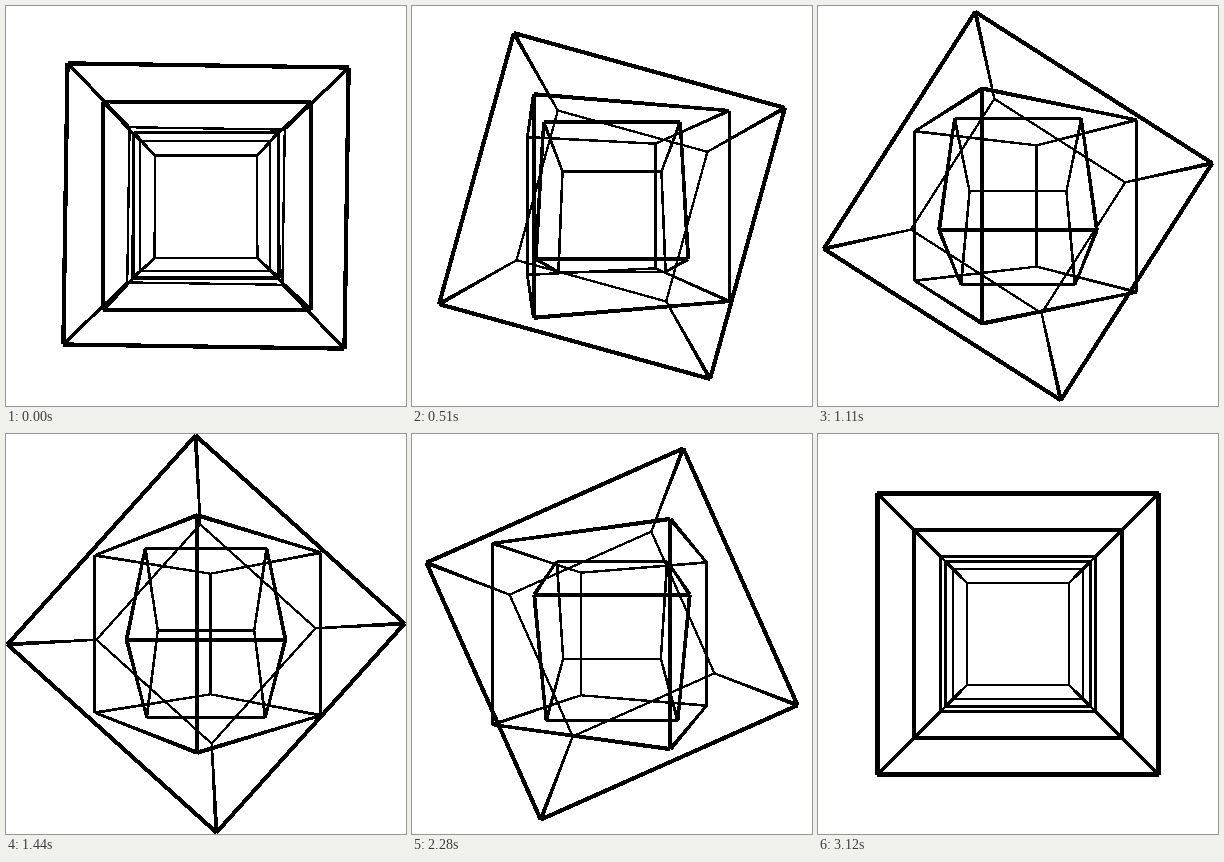
An HTML page for the animation above (3150 ms loop, 400 by 400 pixels).

```html
<!DOCTYPE html>
<html lang="en">
<head>
<meta charset="utf-8">
<title>Three turning cubes</title>
<style>
html, body { margin: 0; width: 100%; height: 100%; overflow: hidden; background: #fff; }
svg { display: block; width: 100%; height: 100%; }
</style>
</head>
<body>
<svg viewBox="-200 -200 400 400"><path id="lines" shape-rendering="crispEdges"/></svg>
<script>
const STEP = 30, STEPS = 105;
const EYE = 200 * Math.sqrt(3); // 60 degree field of view
const HALF_STROKE = 1.5;
const path = document.getElementById('lines');

// Each cube turns about its own axis.
const cubes = [
  { half: 100, turn: (x, y, z, c, s) => [x * c - y * s, x * s + y * c, z] },
  { half: 80, turn: (x, y, z, c, s) => [x * c + z * s, y, z * c - x * s] },
  { half: 60, turn: (x, y, z, c, s) => [x, y * c - z * s, y * s + z * c] }
];

function project([x, y, z]) {
  const k = EYE / (EYE - z);
  return { x: x * k, y: y * k, w: HALF_STROKE * k };
}

// A line whose width follows the perspective at both ends.
function taper(a, b) {
  const dx = b.x - a.x, dy = b.y - a.y, len = Math.hypot(dx, dy) || 1;
  const nx = -dy / len, ny = dx / len;
  const at = (p, side) => `${p.x + side * nx * p.w} ${p.y + side * ny * p.w}`;
  return `M${at(a, 1)}L${at(b, 1)}L${at(b, -1)}L${at(a, -1)}Z`;
}

function cubePath({ half, turn }, angle) {
  const c = Math.cos(angle), s = Math.sin(angle);
  const sign = (i, bit) => i & bit ? half : -half;
  const points = Array.from({ length: 8 }, (_, i) =>
    project(turn(sign(i, 1), sign(i, 2), sign(i, 4), c, s)));
  let d = '';
  for (let i = 0; i < 8; i++)
    for (const bit of [1, 2, 4])
      if (!(i & bit)) d += taper(points[i], points[i | bit]);
  return d;
}

function draw(time) {
  const step = Math.floor(time / STEP) % STEPS + 1;
  const angle = step / STEPS * Math.PI / 2;
  path.setAttribute('d', cubes.map(cube => cubePath(cube, angle)).join(''));
}

function tick(time) {
  draw(time);
  requestAnimationFrame(tick);
}

draw(0);
requestAnimationFrame(tick);
</script>
</body>
</html>
```
